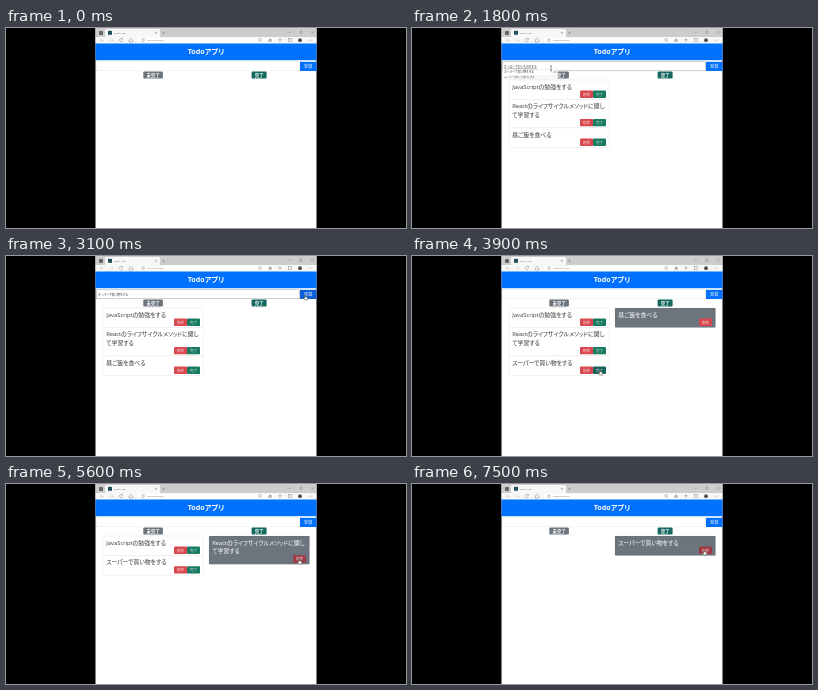
These frames come from a looping animation (400 by 200 pixels, 7600 ms). An HTML page:

```html
<!DOCTYPE html>
<html>
<head>
<meta charset="utf-8">
<title>Todo</title>
<style>
  html, body { margin: 0; width: 100%; height: 100%; overflow: hidden; background: #000; }
  svg { display: block; width: 400px; height: 200px; }
  text {
    font-family: "Open Sans", "Noto Sans CJK JP", "Noto Sans CJK", sans-serif;
    font-feature-settings: "palt";
    fill: #33383d;
  }
  .mid { text-anchor: middle; }
  .white { fill: #fff; }
  .title { font-size: 7.2px; font-weight: 700; }
  .badge { font-size: 4.4px; font-weight: 700; }
  .task { font-size: 5.85px; }
  .btn { font-size: 3.5px; }
  .add { font-size: 4.1px; }
  .small { font-size: 2.9px; }
  .tiny { font-size: 2.5px; fill: #666; }
  .icon { fill: none; stroke: #858585; stroke-width: .5; }
</style>
</head>
<body>
<svg viewBox="0 0 400 200">
  <rect width="400" height="200" fill="#000"/>
  <rect x="89.5" width="221" height="200" fill="#fff"/>

  <!-- browser frame -->
  <rect x="89.5" width="221" height="9.5" fill="#cdcdcd"/>
  <path d="M99 9.5V2.2Q99 1 100.2 1H152.8Q154 1 154 2.2V9.5z" fill="#f7f7f7"/>
  <rect x="89.5" y="9" width="221" height="6.5" fill="#f7f7f7"/>
  <rect x="132" y="9.7" width="136" height="5" rx="1.5" fill="#fff"/>
  <rect x="93" y="3" width="4" height="4" rx="1" fill="#666"/>
  <rect x="102" y="2.8" width="4" height="4" fill="#24525a"/>
  <text class="tiny" x="108" y="5.8">React App</text>
  <text class="tiny" x="141" y="13.2">localhost:3000</text>
  <g class="icon">
    <path d="M149 3.8l2 2m0-2l-2 2M156 4.8h3m-1.5-1.5v3"/>
    <path d="M282.5 4.4h2.6M293.8 3.2h2.2v2.2h-2.2zM305 3.2l2.4 2.4m0-2.4l-2.4 2.4"/>
    <path d="M97.8 12.2h-3.4m1.4-1.4l-1.4 1.4l1.4 1.4" opacity=".5"/>
    <path d="M103.6 12.2h3.4m-1.4-1.4l1.4 1.4l-1.4 1.4" opacity=".4"/>
    <path d="M116.4 11.2a1.7 1.7 0 1 0 .2 1.6M116.6 10.2v1.2h-1.2"/>
    <path d="M123.2 14v-2l1.8-1.6l1.8 1.6v2z"/>
    <circle cx="137" cy="12.2" r="1.4"/>
    <circle cx="254" cy="11.8" r="1.3"/><path d="M255 12.8l1 1"/>
    <path d="M262.4 13.8l1.6-3.4l1.6 3.4l-2.6-2h2.8z"/>
    <path d="M272.4 11.8h3.2m-1.6-1.6v3.6"/>
    <rect x="282.4" y="10.6" width="3" height="3"/>
    <path d="M302.6 12.2h.7m.7 0h.7m.7 0h.7"/>
  </g>
  <circle cx="294" cy="12.2" r="1.9" fill="#4a4a4a"/>

  <!-- page header -->
  <rect x="89.5" y="15.5" width="221" height="16.7" fill="#0070ff"/>
  <text class="title white mid" x="200" y="26.3">Todoアプリ</text>
  <g id="live"></g>
</svg>
<script>
const LOOP = 7600, STEP = 100, TOP = 52;
const RED = '#d9484f', RED_DARK = '#a03a42', GREEN = '#197a62', GREEN_DARK = '#14625a', GREY = '#6c757d';
const JS = ['JavaScriptの勉強をする'];
const REACT = ['Reactのライフサイクルメソッドに関し', 'て学習する'];
const LUNCH = ['昼ご飯を食べる'];
const SHOP = ['スーパーで買い物をする'];

// Both columns, valid from the given time on
const lists = [
  [0, [], []],
  [100, [JS, REACT, LUNCH], []],
  [3300, [JS, REACT, LUNCH, SHOP], []],
  [3900, [JS, REACT, SHOP], [LUNCH]],
  [4500, [JS, SHOP], [LUNCH, REACT]],
  [5300, [JS, SHOP], [REACT]],
  [5700, [JS, SHOP], []],
  [6300, [SHOP], []],
  [6900, [], [SHOP]]
];

// Pointer stops: time, x, y
const path = [
  [100, 139, 40], [2300, 139, 40], [3000, 299, 39], [3300, 299, 39],
  [3800, 188, 114], [4000, 188, 114], [4400, 187, 95], [4800, 187, 95],
  [5200, 293, 66], [5300, 293, 66], [5600, 293, 75], [5750, 293, 75],
  [6200, 177, 67], [6450, 177, 67], [6800, 188, 67], [6950, 188, 67],
  [7400, 292, 66], [7600, 292, 66]
];

const typing = ['s', 'す', 'すー', 'すーp', 'すーぱ', 'すーぱー', 'すーぱーで', 'すーぱーでk',
  'すーぱーでか', 'すーぱーでかい', 'すーぱーでかいm', 'すーぱーでかいも', 'すーぱーでかいもの',
  'すーぱーでかいものを', 'すーぱーでかいものをs', 'すーぱーでかいものをする'];
const hints = ['スーパーで', 'スーパーで買い物', 'スーパーで買った', 'スーパーでは', 'スーパーでも'];

const live = document.getElementById('live');
const box = (x, y, w, h, fill, more = '') =>
  `<rect x="${x}" y="${y}" width="${w}" height="${h}" fill="${fill}" ${more}/>`;
const label = (x, y, cls, s) => `<text x="${x}" y="${y}" class="${cls}">${s}</text>`;
const inside = (p, x, y, w, h) => p && p.x >= x && p.x < x + w && p.y >= y && p.y < y + h;

function pointer(t) {
  if (t < path[0][0]) return null;
  const i = path.findIndex(s => s[0] > t);
  const [t0, x0, y0] = path[i - 1], [t1, x1, y1] = path[i];
  const k = (t - t0) / (t1 - t0), e = k * k * (3 - 2 * k);
  return { x: x0 + (x1 - x0) * e, y: y0 + (y1 - y0) * e, hand: false };
}

function button(x, y, s, color, dark, p) {
  const over = inside(p, x, y, 13, 7.4);
  if (over) p.hand = true;
  return box(x, y, 13, 7.4, over ? dark : color, 'rx=".9"') +
    `<g opacity=".85">${label(x + 6.5, y + 5, 'btn white mid', s)}</g>`;
}

function column(x, tasks, done, p) {
  let y = TOP, out = '';
  for (const lines of tasks) {
    const h = 10.9 + 8.7 * lines.length;
    out += box(x, y, 100.5, h, done ? GREY : '#fff', 'stroke="#000" stroke-opacity=".12" stroke-width=".4" rx=".8"');
    lines.forEach((s, i) => {
      out += label(x + 3.2, y + 8.7 + 8.7 * i, done ? 'task white' : 'task', s);
    });
    const by = y + h - 9;
    out += button(x + (done ? 84 : 71), by, '削除', RED, RED_DARK, p);
    if (!done) out += button(x + 84, by, '完了', GREEN, GREEN_DARK, p);
    y += h;
  }
  return out;
}

function form(t, p) {
  const focus = t >= 100 && t < 3300;
  const over = inside(p, 294, 34, 16.5, 9);
  if (over) p.hand = true;
  let out = box(90.7, 33.8, 203, 9, '#fff', `stroke="${focus ? '#a59c9c' : '#e3e6ea'}" stroke-width=".5"`) +
    box(294, 33.8, 16.5, 9.2, over ? '#0b5ed7' : '#0070ff') +
    label(302.2, 40, 'add white mid', '登録');
  if (!focus || t < 300) return out;
  const composing = t < 2200;
  const s = composing ? typing[Math.min((t - 300) / STEP, typing.length - 1)] : SHOP[0];
  out += `<text x="92" y="39.7" class="small"${composing ? ' text-decoration="underline"' : ''}>${s}</text>`;
  return out;
}

function suggestions(t) {
  if (t < 400 || t >= 2200) return '';
  const items = t < 1400 ? hints : SHOP;
  const h = items.length * 5.4 + (items.length > 1 ? 5 : 0);
  let out = box(90.2, 41.4, 55.6, h + 4.2, '#fff', 'stroke="#d0d0d0" stroke-width=".4"');
  items.forEach((s, i) => { out += label(92.2, 45 + 5.4 * i, 'small', s); });
  if (items.length > 1) out += '<path class="icon" d="M116.5 70.2l1.3 1.3l1.3-1.3"/>';
  out += box(90.4, 41.4 + h, 55.2, 4, '#f6f6f6') +
    label(92, 44.4 + h, 'tiny', 'Tab キーを押して選択します');
  return out + '<path class="icon" d="M139 43.1l1.4 1.4m0-1.4l-1.4 1.4M142.2 43.2h1.6v1.5h-1.6z"/>';
}

function cursor(p) {
  if (!p) return '';
  const at = d => `<path transform="translate(${p.x} ${p.y})" d="${d}" fill="#fff" stroke="#222" stroke-width=".45"/>`;
  if (p.hand) return at('M-.4 0Q0-.7.4 0V1.8L2.4 2.3Q2.9 2.5 2.8 3.2L2.4 5H-.4L-1.8 3.1L-1.2 2.7L-.4 3.3z');
  if (p.x < 294 && p.y > 33 && p.y < 43) return at('M-.9-2.2H.9M0-2.2V2.2M-.9 2.2H.9');
  return at('M0 0V4L.9 3.2L1.6 4.7L2.3 4.4L1.6 3H2.8z');
}

function draw(t) {
  const p = pointer(t);
  const [, open, done] = lists.filter(l => l[0] <= t).pop();
  live.innerHTML =
    form(t, p) +
    box(137.3, 43.4, 19.6, 7.1, GREY, 'rx="1"') + label(147.1, 48.6, 'badge white mid', '未完了') +
    box(245.6, 43.4, 15, 7.1, '#15685f', 'rx="1"') + label(253.1, 48.6, 'badge white mid', '完了') +
    column(97, open, false, p) + column(203, done, true, p) +
    suggestions(t) + cursor(p);
}

const start = performance.now();
let last = -1;
function tick() {
  const t = Math.floor((performance.now() - start) % LOOP / STEP) * STEP;
  if (t !== last) draw(last = t);
  requestAnimationFrame(tick);
}
tick();
</script>
</body>
</html>
```
